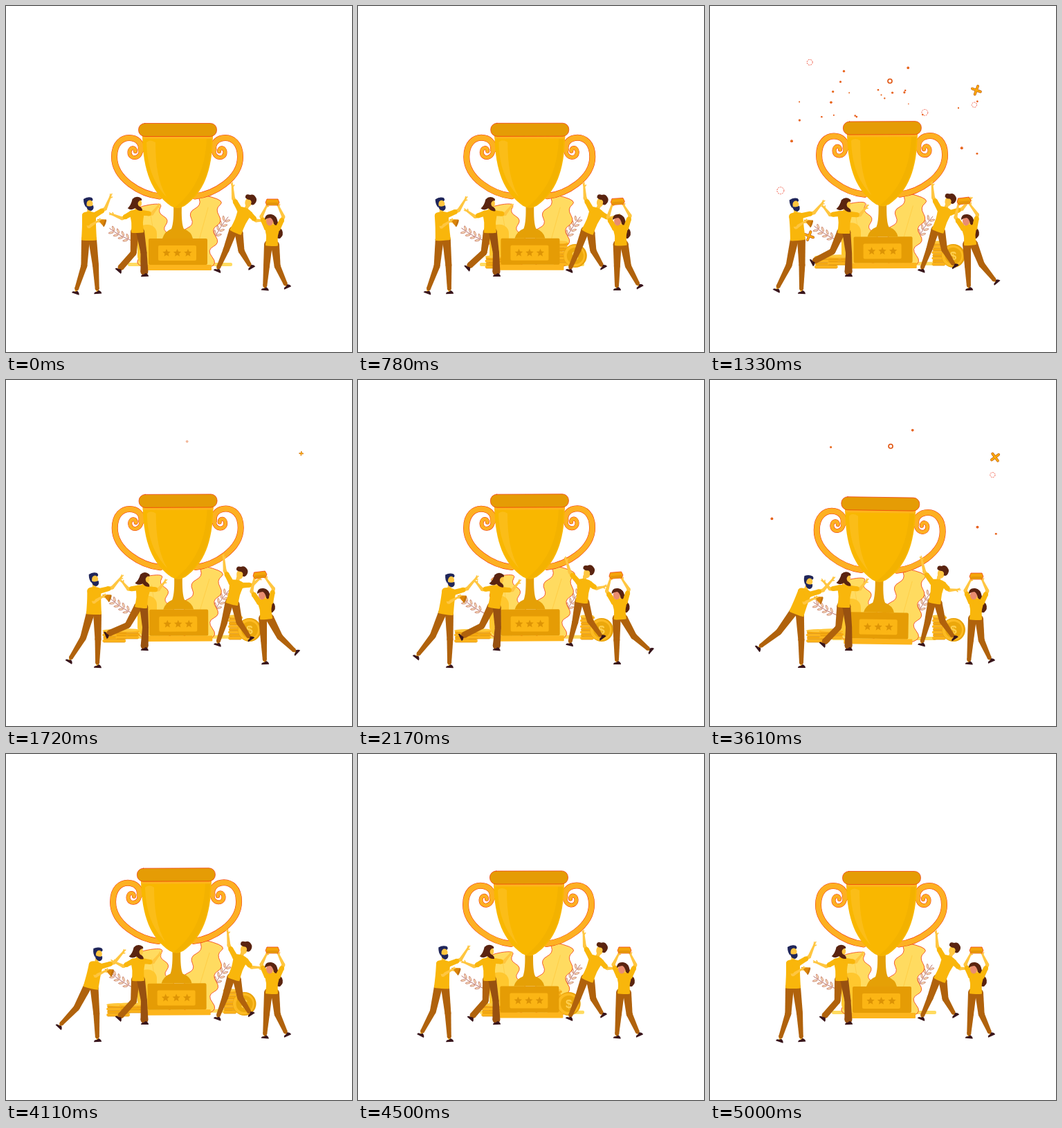
Write an HTML page with a canvas that moves like this. It is 500 by 500 pixels and loops after 5.06 s.

```html
<!DOCTYPE html>
<html lang="en">
<head>
<meta charset="utf-8">
<title>Trophy celebration</title>
<style>
  html, body { margin: 0; width: 100%; height: 100%; overflow: hidden; background: #fff; }
  canvas { display: block; width: 500px; height: 500px; }
</style>
</head>
<body>
<canvas id="stage"></canvas>
<script>
const LOOP = 5060, STEPS = 91;
const SHIRT = '#f9b60b', SKIN = '#ffc640', PANTS = '#b0620c', PANTS_DARK = '#985110';
const HAIR = '#5a2410', NAVY = '#20265a', SHOE = '#38151c', EDGE = '#f0320c';
const GOLD = '#fdb022', AMBER = '#e59c05', LEAF = '#ffdb60';

const canvas = document.getElementById('stage');
const g = canvas.getContext('2d');
const dpr = window.devicePixelRatio || 1;
canvas.width = canvas.height = 500 * dpr;

/* ---------- motion ---------- */

const clamp = v => Math.max(0, Math.min(1, v));
const ease = u => .5 - .5 * Math.cos(Math.PI * clamp(u));
const mix = (a, b, k) => a.map((v, i) => v + (b[i] - v) * k);
const add = (a, b) => a.map((v, i) => v + b[i]);

// Rises from a to b, holds until c, settles by d.
const swing = (t, a, b, c, d) => t < c ? ease((t - a) / (b - a)) : 1 - ease((t - c) / (d - c));

/* ---------- drawing helpers ---------- */

function fill(color, edge) {
  g.fillStyle = color;
  g.fill();
  if (edge) { g.strokeStyle = edge; g.lineWidth = .7; g.stroke(); }
}

function oval(color, x, y, rx, ry = rx) {
  g.beginPath();
  g.ellipse(x, y, rx, ry, 0, 0, 7);
  fill(color);
}

function box(color, x, y, w, h, r = 0, edge) {
  g.beginPath();
  g.roundRect(x, y, w, h, r);
  fill(color, edge);
}

function shape(color, d, edge) {
  const p = new Path2D(d);
  g.fillStyle = color;
  g.fill(p);
  if (edge) { g.strokeStyle = edge; g.lineWidth = .7; g.stroke(p); }
}

function line(color, width, d) {
  g.strokeStyle = color;
  g.lineWidth = width;
  g.lineCap = g.lineJoin = 'round';
  g.stroke(new Path2D(d));
}

// Closed soft outline: the points act as control points.
function blob(color, pts, edge) {
  g.beginPath();
  g.moveTo(...mix(pts[pts.length - 1], pts[0], .5));
  pts.forEach((p, i) => g.quadraticCurveTo(...p, ...mix(p, pts[(i + 1) % pts.length], .5)));
  fill(color, edge);
}

function within([x, y], rot, draw) {
  g.save();
  g.translate(x, y);
  g.rotate(rot);
  draw();
  g.restore();
}

/* ---------- people ---------- */

// Middle joint of a limb, pushed sideways from the straight line.
function bend(a, b, amount) {
  const dx = b[0] - a[0], dy = b[1] - a[1], k = amount / (Math.hypot(dx, dy) || 1);
  return add(mix(a, b, .5), [-dy * k, dx * k]);
}

// Tapered chain with one width per joint.
function limb(color, pts, widths) {
  pts.forEach((p, i) => {
    oval(color, p[0], p[1], widths[i] / 2);
    if (!i) return;
    const q = pts[i - 1], a = Math.atan2(p[1] - q[1], p[0] - q[0]);
    const nx = -Math.sin(a) / 2, ny = Math.cos(a) / 2, w = widths[i], v = widths[i - 1];
    g.beginPath();
    g.moveTo(q[0] + nx * v, q[1] + ny * v);
    g.lineTo(p[0] + nx * w, p[1] + ny * w);
    g.lineTo(p[0] - nx * w, p[1] - ny * w);
    g.lineTo(q[0] - nx * v, q[1] - ny * v);
    fill(color);
  });
}

function leg(color, hip, foot, b, hem = 6) {
  const knee = bend(hip, foot, b);
  const turn = Math.atan2(foot[1] - knee[1], foot[0] - knee[0]) - Math.PI / 2;
  limb(SKIN, [mix(knee, foot, .8), foot], [4, 3]);
  limb(color, [hip, knee, mix(knee, foot, .9)], [12, 9, hem]);
  within(foot, turn, () => shape(SHOE, 'M-5 4Q-5 1 -1 1L2 -1Q6 1 6 4Z'));
}

function arm(shoulder, hand, b, sleeve = .7) {
  const elbow = bend(shoulder, hand, b);
  limb(SKIN, [shoulder, elbow, hand], [6, 5, 2.6]);
  limb(SHIRT, [shoulder, mix(shoulder, elbow, sleeve)], [8, 7]);
  within(hand, Math.atan2(hand[1] - elbow[1], hand[0] - elbow[0]),
    () => line(SKIN, 1.5, 'M-2 0L3 -1.5M-2 0L4 .5M-3 0L0 2.8'));
}

// Places points along the back: x across, y down from the neck.
function spine(neck, hip) {
  const len = Math.hypot(hip[0] - neck[0], hip[1] - neck[1]);
  const ux = (hip[0] - neck[0]) / len, uy = (hip[1] - neck[1]) / len;
  const at = (x, y) => [neck[0] + uy * x + ux * y, neck[1] - ux * x + uy * y];
  return { at, len, lean: Math.atan2(-ux, uy) };
}

function torso({ at, len }, waist = 9) {
  limb(SKIN, [at(0, -5), at(0, 3)], [5, 6]);
  const side = s => [[3, -1], [10, 1], [10, 9], [waist - 1, len * .55], [waist, len], [waist, len + 2]]
    .map(([x, y]) => at(s * x, y));
  blob(SHIRT, [...side(1), ...side(-1).reverse()]);
}

function drawPopperMan(t) {
  const neck = mix([120, 298], [139, 303], swing(t, 450, 3400, 3450, 4900));
  const hip = mix([120, 337], [127, 337], swing(t, 300, 1400, 2900, 5000));
  const foot = mix([101, 412], [71, 386], swing(t, 600, 3650, 3700, 5000));
  const wave = add(neck, mix([31, -23], [39, -15], swing(t, 200, 1400, 4100, 5000)));
  const hold = add(neck, [14, 12]), s = spine(neck, hip);
  leg(PANTS, s.at(-5, s.len), foot, -5);
  leg(PANTS, s.at(5, s.len), [132, 412], -1);
  arm(s.at(7, 5), wave, 6);
  torso(s, 11);
  within(s.at(0, -12), s.lean * .6, () => {
    shape(NAVY, 'M-8 -7Q-2 -11 4 -9Q7 -6 4 -4L-2 -3L-4 5Q-8 1 -8 -7Z');
    oval(SKIN, 1, 0, 4.5, 5.5);
    shape(NAVY, 'M-4 2Q0 5 6 2Q8 8 3 10Q-4 9 -4 2Z');
  });
  within(hold, .35, () => {
    shape('#dc8507', 'M-3 -1L9 -5L10 6Z');
    oval('#c0700c', 9.5, .5, 1.4, 5.5);
  });
  arm(s.at(-6, 5), hold, 13);
}

function drawLongHair(t) {
  const k = swing(t, 300, 2450, 2550, 4600);
  const neck = mix([189, 295], [202, 298], k), hip = mix([190, 326], [197, 328], k);
  const foot = mix([164, 380], [147, 367], swing(t, 300, 1700, 1800, 3000));
  const left = mix([-36, 6], [-31, -6], swing(t, 300, 1300, 3500, 4300));
  const s = spine(neck, hip);
  leg(PANTS, s.at(-4, s.len), foot, -10, 9);
  leg(PANTS_DARK, s.at(4, s.len), [200, 387], -2, 11);
  arm(s.at(-7, 4), add(neck, left), -7);
  torso(s);
  arm(s.at(7, 4), add(neck, [31, -6]), 7);
  within(s.at(0, -10), s.lean * .5, () => {
    oval(SKIN, 3, 0, 4.5, 6);
    shape(HAIR, 'M-6 -6Q0 -12 7 -7Q9 -3 5 -4Q0 -1 3 4Q9 7 8 11Q2 12 -2 7Q-8 11 -13 7Q-8 3 -6 -6Z');
  });
}

function drawReacher(t) {
  const k = swing(t, 600, 2850, 2900, 4750);
  const neck = mix([347, 293], [322, 287], k), hip = mix([332, 326], [321, 319], k);
  const reach = mix([-20, -34], [-44, -15], swing(t, 1800, 2850, 2900, 3900));
  const beat = swing(t, 500, 1350, 1400, 2300) + swing(t, 1900, 2850, 2900, 3800);
  const s = spine(neck, hip);
  arm(s.at(8, 5), add(neck, mix([27, 17], [35, -12], beat)), 5);
  leg(PANTS, s.at(5, s.len), mix([353, 376], [351, 369], k), 5);
  leg(PANTS, s.at(-4, s.len), [306, 380], -1);
  torso(s);
  arm(s.at(-8, 5), add(neck, reach), -4);
  within(add(neck, [5, -12]), s.lean * .5, () => {
    oval(SKIN, -1, 3, 5, 7);
    shape(HAIR, 'M-7 -3Q-8 -9 -1 -8Q4 -11 8 -6Q11 -3 9 2Q7 7 3 5Q4 0 0 -1Q-4 0 -7 -3Z');
  });
}

function drawLifter(t) {
  const k = swing(t, 200, 1300, 1700, 2900);
  const neck = mix([385, 317], [374, 317], k), hip = mix([384, 345], [376, 344], k);
  const brick = add(neck, mix([0, -33], [-7, -35], k)), head = add(neck, [-3, -8]);
  const foot = mix([405, 404], [421, 390], swing(t, 600, 2150, 2200, 3400));
  const hand = side => add(brick, [side * 8, 4]);
  const s = spine(neck, hip);
  within(head, 0, () => shape(HAIR, 'M-6 -5Q8 -12 11 4Q12 9 17 15Q20 22 14 27Q8 28 5 20Z'));
  leg(PANTS, s.at(5, s.len), foot, 5);
  leg(PANTS, s.at(-5, s.len), [374, 407], 0);
  torso(s);
  arm(s.at(-8, 4), hand(-1), -8);
  arm(s.at(8, 4), hand(1), 8);
  within(head, 0, () => {
    oval('#e98d70', -1, 2, 5, 6.5);
    shape(HAIR, 'M-8 0Q-8 -9 1 -8Q10 -7 9 6L5 6Q4 -1 0 -3Q-4 -3 -8 0Z');
  });
  within(brick, -.12 * k, () => {
    shape('#f4a50a', 'M-8 -5H8L10 0L8 4H-8L-10 0Z', EDGE);
    box('#e59508', -8, 0, 16, 4, 1);
  });
}

/* ---------- scenery ---------- */

const lift = t => -4.5 * (swing(t, 600, 1900, 2700, 3700) + swing(t, 3600, 3950, 4150, 4600));

function star(x, y, r) {
  g.beginPath();
  for (let i = 0; i < 10; i++) {
    const a = i * Math.PI / 5 - Math.PI / 2, k = i % 2 ? r * .45 : r;
    g.lineTo(x + Math.cos(a) * k, y + Math.sin(a) * k);
  }
  fill('#dd9405');
}

function handle() {
  const arc = 'M222 275C195 272 156.5 250 156.5 218C156.5 198 168 190.5 178 190.5C189 190.5 197 198 195 208';
  const curl = 'M195 205C197 222 178 223 178.5 211C179 204 187 203 187 210';
  line(EDGE, 9, arc);
  line(EDGE, 6, curl);
  line(GOLD, 8, arc);
  line(GOLD, 5, curl);
}

function drawTrophy(t) {
  const tilt = swing(t, 2900, 3600, 3650, 4100) * .019 - swing(t, 500, 1300, 4200, 4800) * .004;
  const shift = swing(t, 500, 1300, 1400, 2200) - 2 * swing(t, 2200, 2900, 4200, 4800);
  within([247.5 + shift, 200 + lift(t)], tilt, () => {
    g.translate(-247.5, -200);
    handle();
    g.save();
    g.translate(495, 0);
    g.scale(-1, 1);
    handle();
    g.restore();
    shape('#e5a006', 'M242 285H254Q253 315 257 322Q268 326 270 336H226Q229 326 239 322Q243 312 242 285Z');
    shape('#f9b700', 'M197 187H299C298 240 285 270 258 289Q248 295 238 289C211 270 198 240 197 187Z');
    shape('#fbbd18', 'M203 197Q208 192 216 197C216 230 220 255 232 276C212 255 204 230 203 197Z');
    shape('#f3b200', 'M290 192H297C296 240 283 270 257 288Q250 292 244 291C276 266 288 232 290 192Z');
    box('#fdb51c', 197, 187, 102, 5, 1);
    box(AMBER, 191.5, 169.5, 113, 19, 9, EDGE);
    box('#fdb51c', 198, 374, 99, 8, 1);
    box(AMBER, 206, 336, 85, 38, 2);
    box('#fbb514', 220, 346, 55, 22, 2);
    for (const i of [-1, 0, 1]) star(247.5 + i * 15.5, 357, 6);
  });
}

function stack(x, base, count, w) {
  for (let i = 0; i < count; i++) {
    const y = base - i * 4.2 - 4;
    box(i % 2 ? '#f5a910' : '#fdb51c', x + i % 2, y, w, 4, 2);
    line('#d98c08', .7, `M${x + 2} ${y + 4}H${x + w - 2}`);
  }
  oval('#ffc83c', x + w / 2, base - count * 4.2, w / 2, 2.2);
}

function drawCoins(t) {
  within([68 * (1 - swing(t, 100, 1800, 3900, 5000)), 0], 0, () => {
    stack(139, 379, 4, 34);
    stack(158, 374, 3, 34);
  });
  within([-82 * (1 - swing(t, 100, 1400, 3900, 5000)), 0], 0, () => {
    stack(321, 375, 8, 20);
    oval('#e9a20a', 352, 361, 17);
    oval('#fdbb22', 351, 361, 15.5);
    oval('#eca80c', 352, 361, 12);
    g.fillStyle = '#ffd050';
    g.font = 'bold 17px "Liberation Sans", Arial, sans-serif';
    g.textAlign = 'center';
    g.textBaseline = 'middle';
    g.fillText('$', 352, 362);
  });
}

function sprig(x, y, rot, length) {
  within([x, y], rot, () => {
    line('#b06058', .8, `M0 0Q${length / 2} -3 ${length} 0`);
    for (let i = 1; i < 5; i++) for (const side of [-1, 1]) {
      g.beginPath();
      g.ellipse(i * length / 5 + 3, side * 3.5 - 1, 3.6, 1.2, side * .7, 0, 7);
      fill('#ffe9c0', '#c07060');
    }
  });
}

// Oak leaf growing along x, with alternating lobes and notches.
function leaf(x, y, rot, length, width) {
  const half = side => Array.from({ length: 8 }, (_, i) =>
    [i / 7 * length, side * width * (i % 2 ? 1 : .42) * (1 - i / 16)]);
  within([x, y], rot, () => {
    blob(LEAF, [...half(-1), ...half(1).reverse()], EDGE);
    line('#ffcf48', 1, `M0 0H${length * .85}`);
  });
}

function drawPlants(t) {
  const dy = lift(t), a = -dy * .02;
  sprig(184, 340 + dy / 2, 3.64 + a, 39);
  sprig(300, 339 + dy / 2, -1.02 + a / 2, 40);
  box(LEAF, 176, 371 + dy / 2, 151, 5, 2);
  leaf(222, 378 + dy, -1.74 + a / 4, 92, 38);
  leaf(268, 378 + dy, -1.3 + a / 4, 106, 38);
  box('#ffc72e', 190, 316 + dy, 28, 58, 13);
}

/* ---------- confetti ---------- */

function random(seed) {
  return () => (seed = seed * 16807 % 2147483647) / 2147483647;
}

const bit = (x, y, kind, size, end) => ({ x, y, kind, size, end });

// Offsets from the middle of the burst at spread 1.
const bits = [
  bit(129, -48, 'cross', 6, .9), bit(-111, 161, 'cross', 6, .55),
  bit(5, -61, 'ring', 3, .9), bit(126, -27, 'dash', 3.6, .85),
  bit(-110, -88, 'dash', 4, .55), bit(55, -16, 'dash', 4.4, .55), bit(-152, 96, 'dash', 5, .55),
  bit(31, -80, 'dot', 1.8, .85), bit(-66, -60, 'dot', 1.5, .8),
  bit(-136, 25, 'dot', 1.9, .8), bit(108, 35, 'dot', 1.9, .85), bit(130, 43, 'dot', 1.4, .8)
];
const rnd = random(29);
for (let i = 0; i < 20; i++) {
  const a = Math.PI * (1.02 + .96 * rnd()), r = 35 + 75 * rnd();
  bits.push(bit(Math.cos(a) * r * 1.3, Math.sin(a) * r * .8, 'dot', .9 + rnd() * .9, .5 + rnd() * .07));
}

function drawBit({ kind, size }) {
  if (kind === 'cross') {
    const n = size * .35;
    const d = `M${-size} ${-n}L${size} ${n}M${-n} ${size}L${n} ${-size}`;
    line('#b8540c', 3.8, d);
    line('#fba90c', 2.6, d);
  } else if (kind === 'dot') {
    oval('#ef3e10', 0, 0, size);
    oval('#d98a10', 0, 0, size * .6);
  } else {
    const dashed = kind === 'dash';
    g.beginPath();
    g.arc(0, 0, size, 0, 7);
    g.lineCap = 'butt';
    g.setLineDash(dashed ? [2, 1.2] : []);
    g.strokeStyle = dashed ? '#f0503a' : '#e0520c';
    g.lineWidth = dashed ? .9 : 1.6;
    g.stroke();
    g.setLineDash([]);
  }
}

function burst(age) {
  const p = age / 900;
  if (p <= 0 || p >= 1) return;
  const spread = 1.34 * (1 - (1 - p) ** 2.5);
  for (const b of bits) {
    const k = clamp((b.end - p) * 10);
    if (!k) continue;
    within([255 + b.x * spread, 170 + b.y * spread], b.kind === 'cross' ? (p - .42) * 3 : 0, () => {
      g.scale(k, k);
      drawBit(b);
    });
  }
}

/* ---------- loop ---------- */

function draw(t) {
  g.setTransform(dpr, 0, 0, dpr, 0, 0);
  g.fillStyle = '#fff';
  g.fillRect(0, 0, 500, 500);
  drawPlants(t);
  drawCoins(t);
  burst(t - 950);
  burst(t - 3060);
  drawTrophy(t);
  drawPopperMan(t);
  drawLongHair(t);
  drawReacher(t);
  drawLifter(t);
}

const begin = performance.now();
function tick() {
  const t = (performance.now() - begin) % LOOP;
  draw(Math.floor(t * STEPS / LOOP + .15) % STEPS * LOOP / STEPS);
  requestAnimationFrame(tick);
}
tick();
</script>
</body>
</html>
```
